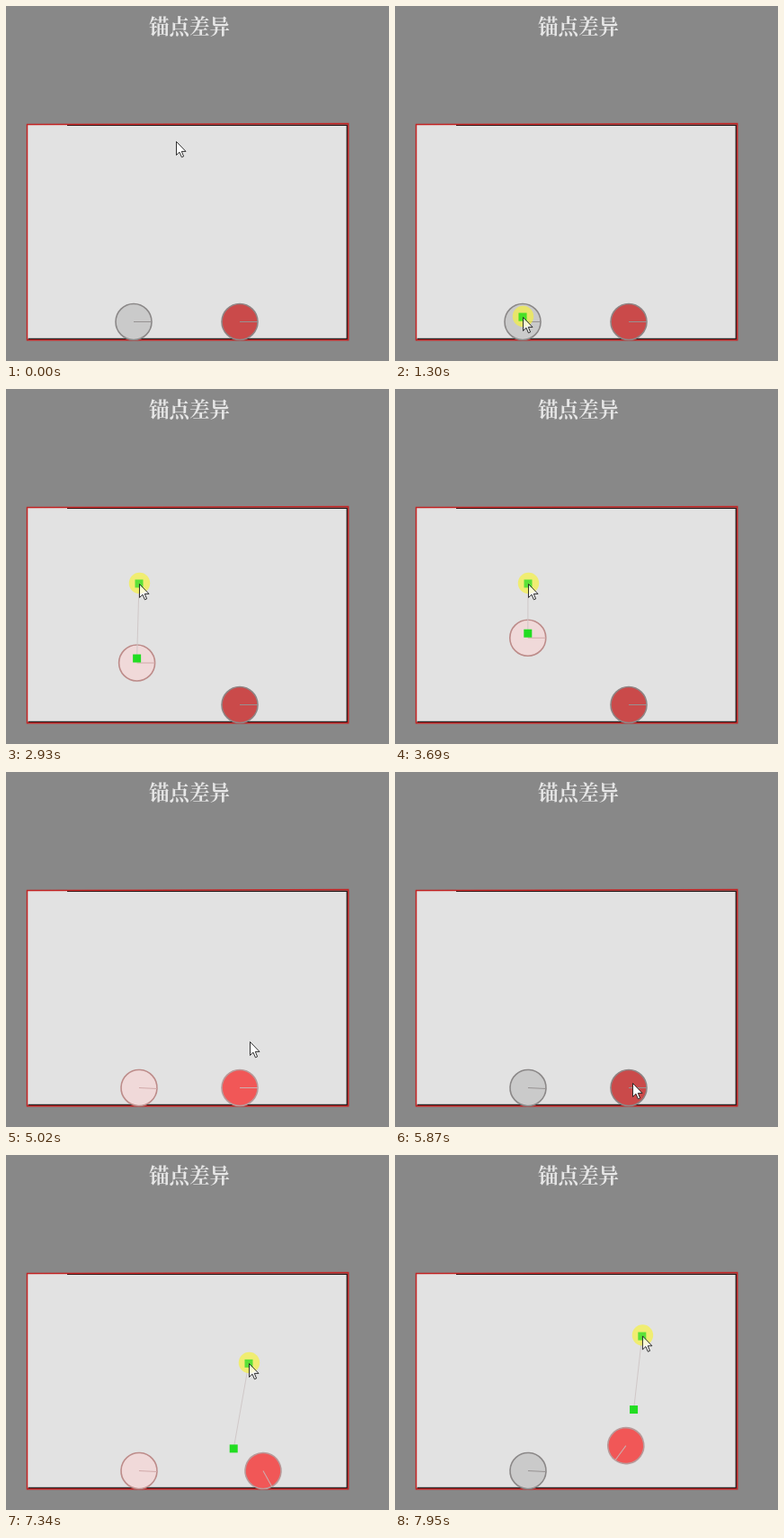
Write an HTML page that moves like this. It is 426 by 394 pixels and loops after 8 s.

```html
<!DOCTYPE html>
<html lang="zh-CN">
<head>
<meta charset="utf-8">
<style>
  html, body { margin: 0; width: 100%; height: 100%; overflow: hidden; background: #888; }
  svg { display: block; width: 426px; height: 394px; }
  text { font: 600 22.5px "Noto Serif CJK SC", "Noto Sans CJK SC", "Noto Sans CJK", serif; fill: #e6e6e6; }
</style>
</head>
<body>
<svg viewBox="0 0 426 394">
  <rect width="426" height="394" fill="#888"/>
  <text x="204" y="31" text-anchor="middle">锚点差异</text>
  <rect x="24" y="132" width="356" height="238" fill="#e2e2e2"/>
  <path d="M68 132.3H379.3V369.5H24.5" fill="none" stroke="#241c1c" stroke-width="1.3"/>
  <path d="M23.5 370.8V131.6L157 131.2L380.7 130.5V370.8Z" fill="none" stroke="#c42424" stroke-width="1.5"/>
  <g id="pale"><circle r="20" stroke-width="1.6"/><path d="M0 0H20"/></g>
  <g id="red"><circle r="20" stroke-width="1.6"/><path d="M0 0H20"/></g>
  <g id="joint">
    <line id="link" stroke="#d0c8c8"/>
    <rect id="anchor" width="9" height="9" fill="#22dd22"/>
    <circle id="glow" r="11.7" fill="#f6f23c" fill-opacity=".68"/>
    <rect id="target" width="9" height="9" fill="#22dd22" fill-opacity=".72"/>
  </g>
  <path id="cursor" d="M.5 .5V15.5L4 12.2L6.4 17.8L8.6 16.9L6.3 11.4H11Z" fill="#fff" stroke="#1c1c1c" stroke-width=".9" stroke-linejoin="round"/>
</svg>
<script>
const LOOP = 8000, FLOOR = 350.5;
const PRESS = 1300, RELEASE = 4400, REST = 5870, PRESS_AGAIN = 6400;
const WAKE_DELAY = 80, SLEEP_DELAY = 1050;

const $ = id => document.getElementById(id);
const set = (el, attrs) => { for (const k in attrs) el.setAttribute(k, attrs[k]); };
const mix = (a, b, u) => a + (b - a) * u;
const phase = (t, from, to) => Math.min(1, Math.max(0, (t - from) / (to - from)));
const glide = (t, from, to) => (1 - Math.cos(Math.PI * phase(t, from, to))) / 2;
const between = (t, a, b) => t >= a && t < b;

// Eased moves from a starting point, one leg after another.
const journey = (origin, legs) => t => legs.reduce(([x, y], leg) => {
  const u = glide(t, leg.from, leg.to);
  return [mix(x, leg.x, u), mix(y, leg.y, u)];
}, origin);

const mouse = journey([189, 150], [
  { from: 40, to: 510, x: 130, y: 337 },
  { from: 510, to: 600, x: 142, y: 345 },
  { from: 1380, to: 2720, x: 148, y: 216 },
  { from: 4640, to: 5020, x: 271, y: 299 },
  { from: 5020, to: 5700, x: 264, y: 345 },
  { from: 6540, to: 7340, x: 270, y: 231 },
  { from: 7340, to: 8000, x: 275, y: 200 }
]);

const redCentre = journey([260, FLOOR], [
  { from: 6500, to: 7340, x: 286, y: FLOOR },
  { from: 7340, to: 8150, x: 252, y: 318 }
]);
const redPose = t => [...redCentre(t), 142 * glide(t, 6500, 8350)];

// Pulled up with a slowing rise, then dropped under gravity.
function palePose(t) {
  const rise = Math.sin(Math.PI / 2 * phase(t, 2180, 4000));
  const fall = phase(t, RELEASE, RELEASE + 600);
  return [142 + 6 * rise, FLOOR - 77 * rise * (1 - fall * fall), 3 * fall];
}

const looks = {
  pale: {
    awake: { fill: "#f0d9d9", edge: "#bd8c8a", line: "#d0a8a8" },
    asleep: { fill: "#cacaca", edge: "#8b8888", line: "#969292" }
  },
  red: {
    awake: { fill: "#f15757", edge: "#b99a9a", line: "#cbb0b0" },
    asleep: { fill: "#ca4a4a", edge: "#8f8585", line: "#969292" }
  }
};

function drawBall(id, [x, y, angle], awake) {
  const { fill, edge, line } = looks[id][awake ? "awake" : "asleep"];
  const g = $(id);
  set(g, { transform: `translate(${x} ${y}) rotate(${angle})`, fill });
  set(g.firstChild, { stroke: edge });
  set(g.lastChild, { stroke: line });
}

// The first grip holds the ball near its centre, the second a point outside it.
function gripPoint(pale, [x, y, angle], second) {
  if (!second) return [pale[0], pale[1] - 5];
  const a = (angle + 156) * Math.PI / 180;
  return [x + 41 * Math.cos(a), y + 41 * Math.sin(a)];
}

const square = (id, x, y) => set($(id), { x: x - 4.5, y: y - 4.5 });

function draw(t) {
  const [mx, my] = mouse(t), [tx, ty] = mouse(t - 30);
  const pale = palePose(t), red = redPose(t);
  const second = t >= PRESS_AGAIN, held = second || between(t, PRESS, RELEASE);
  const woken = PRESS + WAKE_DELAY;

  drawBall("pale", pale, between(t, woken, REST) || between(t, PRESS_AGAIN, PRESS_AGAIN + SLEEP_DELAY));
  drawBall("red", red, between(t, woken, woken + SLEEP_DELAY) || between(t, RELEASE, REST) || second);

  const [ax, ay] = gripPoint(pale, red, second);
  set($("joint"), { visibility: held ? "visible" : "hidden" });
  set($("link"), { x1: ax, y1: ay, x2: tx, y2: ty });
  square("anchor", ax, ay);
  square("target", tx, ty);
  set($("glow"), { cx: mx + .5, cy: my - .5 });
  set($("cursor"), { transform: `translate(${mx} ${my})`, "fill-opacity": held ? .7 : 1 });
}

const start = performance.now();
function tick() {
  draw((performance.now() - start) % LOOP);
  requestAnimationFrame(tick);
}
tick();
</script>
</body>
</html>
```
